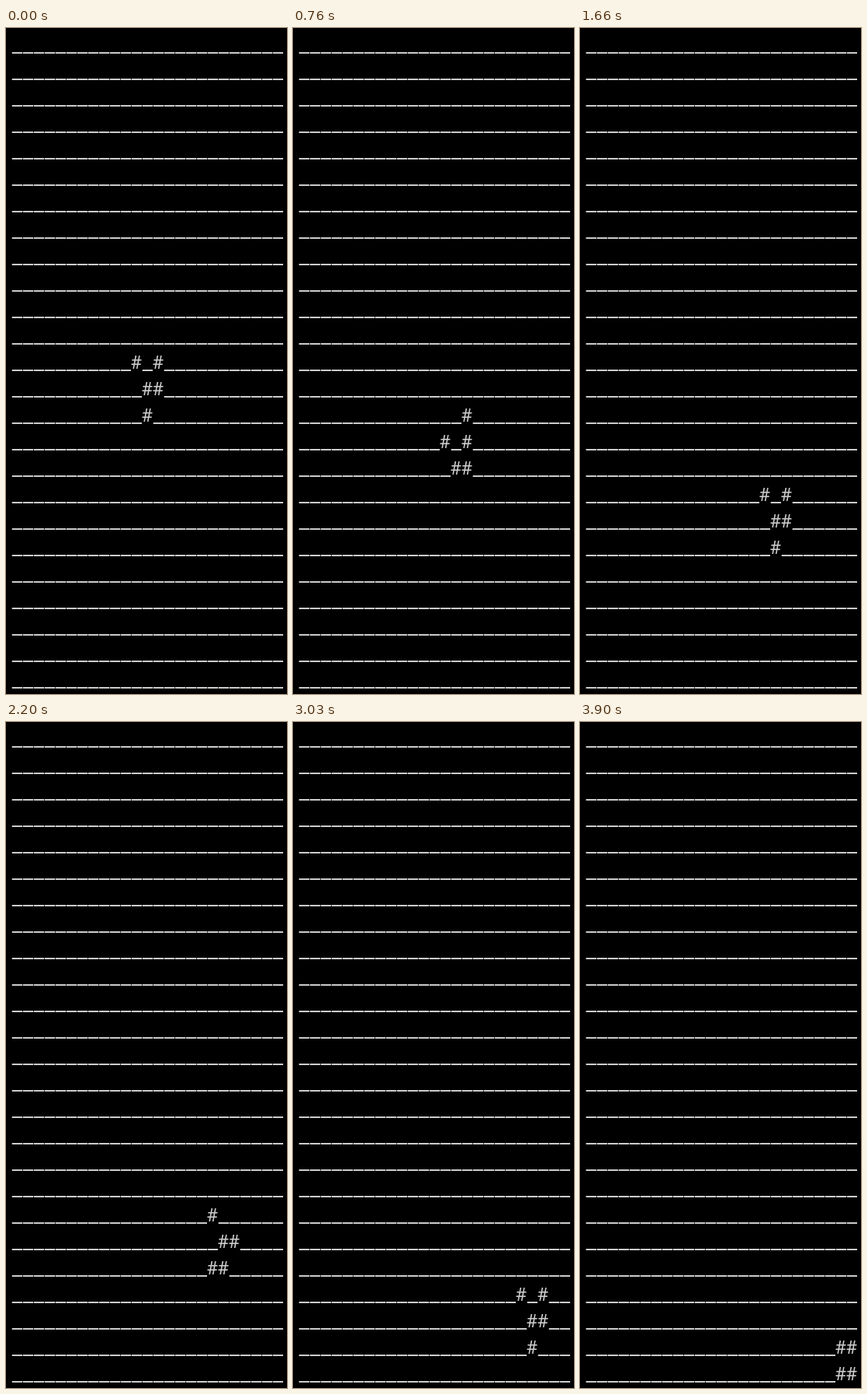
Animation of 362 by 856 pixels, one loop 4160 ms. Source, as an HTML page with a canvas:

```html
<!DOCTYPE html>
<html lang="en">
<head>
<meta charset="utf-8">
<title>Glider</title>
<style>
  html, body { margin: 0; width: 100%; height: 100%; overflow: hidden; background: #000; }
  canvas { display: block; }
</style>
</head>
<body>
<canvas id="stage" width="362" height="856"></canvas>
<script>
const SIZE = 25, CELL_W = 14, CELL_H = 34, LEFT = 7, BASELINE = 30;
const LOOP = 4160;

// Ticks (1/30 s) between one generation and the next.
const GAPS = "3232323232323" + "3232232" + "34" + "2232332" + "3223232" + "3232322" + "333";

const ctx = document.getElementById("stage").getContext("2d");

// Tick times are cut to whole hundredths of a second.
let ticks = 0;
const changes = [...GAPS].map(gap => {
  ticks += Number(gap);
  return Math.floor(ticks * 10 / 3) * 10;
});

const emptyGrid = () => Array.from({ length: SIZE }, () => Array(SIZE).fill(false));

function neighbours(grid, row, col) {
  let count = 0;
  for (let r = row - 1; r <= row + 1; r++)
    for (let c = col - 1; c <= col + 1; c++)
      if ((r !== row || c !== col) && grid[r]?.[c]) count++;
  return count;
}

const evolve = grid => grid.map((line, row) => line.map((alive, col) => {
  const n = neighbours(grid, row, col);
  return n === 3 || (alive && n === 2);
}));

const start = emptyGrid();
["#_#", "_##", "_#_"].forEach((line, r) =>
  [...line].forEach((mark, c) => { start[12 + r][11 + c] = mark === "#"; }));

const generations = [start];
changes.forEach(() => generations.push(evolve(generations.at(-1))));

function draw(grid) {
  ctx.fillStyle = "#000";
  ctx.fillRect(0, 0, 362, 856);
  ctx.fillStyle = "#ccc";
  ctx.font = '23.33px "Noto Sans Mono", "DejaVu Sans Mono", monospace';
  grid.forEach((line, row) => line.forEach((alive, col) => {
    const x = LEFT + col * CELL_W, y = row * CELL_H;
    if (alive) ctx.fillText("#", x, y + BASELINE);
    else ctx.fillRect(x + 0.7, y + 31, 13.3, 2);
  }));
}

let shown = -1;
function frame() {
  const time = performance.now() % LOOP;
  const current = changes.filter(change => change <= time).length;
  if (current !== shown) draw(generations[shown = current]);
  requestAnimationFrame(frame);
}
frame();
</script>
</body>
</html>
```
